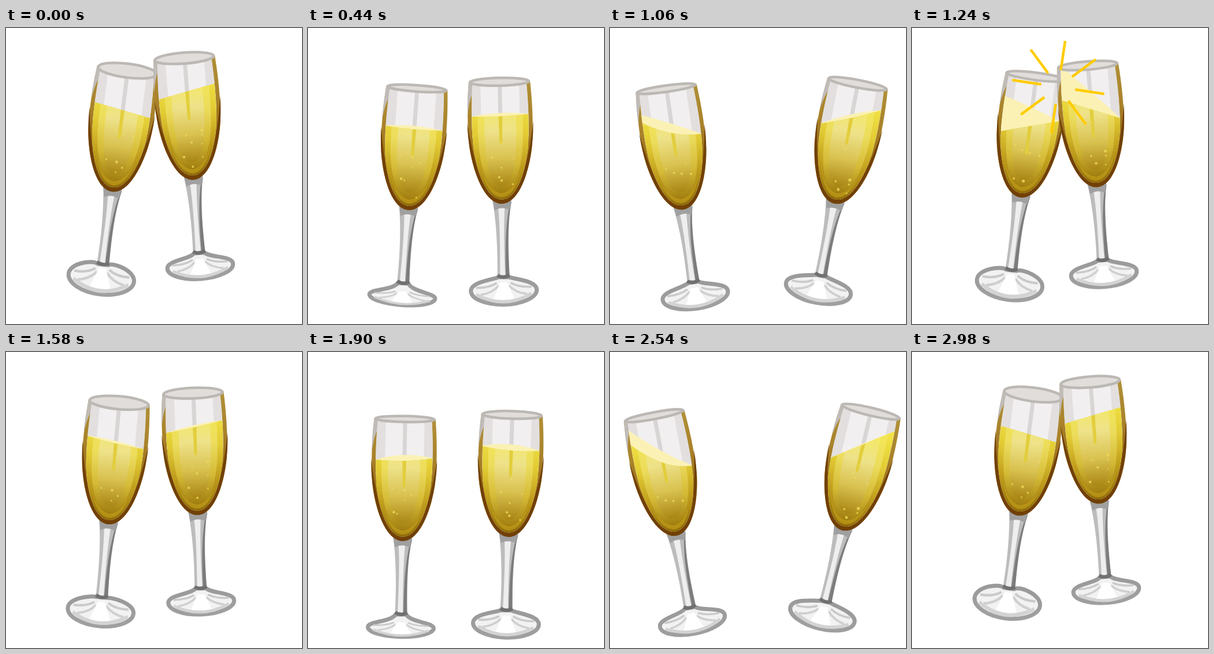
Recreate the animation shown at these times as an HTML page. Size 512x512 px, loop 3 s.

```html
<!DOCTYPE html>
<html lang="en">
<head>
<meta charset="utf-8">
<title>Cheers</title>
<style>
  html, body { margin: 0; width: 100%; height: 100%; overflow: hidden; background: #fff; }
  svg { display: block; width: 100vw; height: 100vh; }
</style>
</head>
<body>
<svg id="stage" viewBox="0 0 512 512"></svg>
<script>
const LOOP = 3000;
const CYCLE = 1500;
const CLINK = 1240;
const TAU = Math.PI * 2;
const stage = document.getElementById('stage');

// Key moments shared by both glasses: time, swing apart, drop, slosh of the liquid
const BEATS = [
  [0, 0, 0, 8], [440, .167, .58, 1], [660, .5, 1, -8], [840, .76, .82, -15],
  [1000, 1, .66, 22], [1240, 0, .18, -15], [1380, 0, 0, 8],
  [1900, .32, .8, -2], [2160, .5, 1, -8], [2500, 1, .66, 22],
  [2540, .945, .6, 28], [2740, 0, .18, -15], [2880, 0, 0, 8], [3000, 0, 0, 8]
];

function bowl(w, top, bottom) {
  const half = s => `C${s * w * .9},-175 ${s * w * .53},${bottom} 0,${bottom}`;
  return `M${-w},${top} C${-w * 1.08},-290 ${-w * 1.07},-250 ${-w * 1.02},-222 ${half(-1)}
    C${w * .53},${bottom} ${w * .9},-175 ${w * 1.02},-222
    C${w * 1.07},-250 ${w * 1.08},-290 ${w},${top}Z`;
}
const OUTER = bowl(53, -337, -125);
const INNER = bowl(46.5, -338, -132);

function gradient(id, y1, y2, ...colors) {
  const stops = colors.map((c, i) => `<stop offset="${i / (colors.length - 1)}" stop-color="${c}"/>`);
  return `<linearGradient id="${id}" gradientUnits="userSpaceOnUse" x1="0" x2="0" y1="${y1}" y2="${y2}">${stops.join('')}</linearGradient>`;
}

function noise(n) {
  const v = Math.sin(n * 91.7 + 13.1) * 4375.5;
  return v - Math.floor(v);
}

const band = (x, w, color) => `<rect x="${x}" y="-340" width="${w}" height="100" fill="${color}"/>`;

function glassMarkup(id) {
  return `<g id="${id}">
    <path class="foot" fill="#f2f2f2" stroke="url(#footEdge)" stroke-width="7"/>
    <g class="shine" fill="none">
      <path d="M-48,31 Q0,60 48,31" stroke="#d3d3d3" stroke-width="6"/>
      <path d="M-12,11 Q-26,20 -48,19 M12,11 Q26,20 48,19" stroke="#cacaca" stroke-width="4"/>
      <path d="M-9,16 Q-20,29 -40,32 M9,16 Q20,29 40,32" stroke="#cfcfcf" stroke-width="4"/>
      <path d="M-6,10 L-18,40 Q0,44 18,40 L6,10Z" fill="#fff"/>
    </g>
    <path d="M-17,-136 C-10,-92 -9,-45 -10.5,0 Q0,6 10.5,0 C9,-45 9,-92 17,-136Z" fill="#bcbcbc"/>
    <path d="M-7,-124 C-4,-85 -5,-45 -6,0 L3,1 C2,-45 2,-85 5,-124Z" fill="#eeeeee"/>
    <path d="M17,-130 C8,-92 9,-45 10.5,0 L4,1 C4,-50 5,-85 13,-122Z" fill="#7c7c7c"/>
    <path d="M-16,-130 H16 L13,-114 Q0,-121 -13,-114Z" fill="#a0a0a0"/>
    <path d="M-10.5,-1 Q0,5 10.5,-1" fill="none" stroke="#707070" stroke-width="6"/>
    <path d="${OUTER}" fill="url(#wall)"/>
    <path d="M-53,-337 Q-57,-300 -56,-280 Q-53,-306 -46,-318 V-337Z" fill="#c0bbb6"/>
    <path d="M-57,-266 C-57,-200 -34,-125 0,-125 C34,-125 57,-200 57,-266 C48,-195 28,-131 0,-131 C-28,-131 -48,-195 -57,-266Z" fill="#714006"/>
    <g clip-path="url(#inner)">
      <path d="${INNER}" fill="#f1eff0"/>
      ${band(-54, 21, '#e2dfde')}${band(-3, 7, '#d8d5d4')}${band(34, 20, '#e2dfde')}
      <path class="surface" fill="#fbf1b4"/>
      <g clip-path="url(#${id}Fill)">
        <path d="${INNER}" fill="url(#amber)"/>
        <path d="${bowl(37, -345, -141)}" fill="url(#gold)"/>
        <path d="${bowl(26, -345, -155)}" fill="url(#glow)"/>
        <path class="streak" fill="#e2ce3c"/>
        <path d="M-36,-190 Q-23,-145 0,-143 Q23,-145 36,-190 Q24,-137 0,-136 Q-24,-137 -36,-190Z" fill="#c9a51c" opacity=".6"/>
        <g class="bubbles" fill="#f3e05c"></g>
      </g>
    </g>
    <ellipse class="rim" cy="-336" rx="51" fill="#e0dddb" stroke="#bcb8b4" stroke-width="4.5"/>
  </g>`;
}

stage.innerHTML = `<defs>
  ${gradient('wall', -337, -125, '#b09038', '#a9822a', '#926410', '#6f3d04')}
  ${gradient('amber', -300, -132, '#f0e245', '#e2cb34', '#bf9c1c', '#8f6a0a')}
  ${gradient('gold', -300, -141, '#f3e757', '#ecdc5c', '#d4ba36', '#9f7b0e')}
  ${gradient('glow', -300, -155, '#f5ea60', '#eee28a', '#d9c250', '#a98514')}
  ${gradient('footEdge', -5, 55, '#999999', '#a0a0a0')}
  <clipPath id="inner"><path d="${INNER}"/></clipPath>
  <clipPath id="leftFill"><path/></clipPath>
  <clipPath id="rightFill"><path/></clipPath>
</defs>
${glassMarkup('left')}${glassMarkup('right')}
<path id="sparks" fill="none" stroke="#ffcc00" stroke-width="4.5"/>`;

// dir: the way the glass swings, -1 left or 1 right
function makeGlass(id, settings) {
  const root = document.getElementById(id);
  const part = name => root.querySelector('.' + name);
  const bubbles = Array.from({ length: 11 }, (_, i) => {
    const dot = document.createElementNS('http://www.w3.org/2000/svg', 'circle');
    const seed = settings.x + i;
    part('bubbles').append(dot);
    return { dot, x: noise(seed) * 60 - 30, phase: noise(seed + 40), r: 1.4 + noise(seed + 80) * 1.5 };
  });
  return {
    ...settings, root, bubbles, foot: part('foot'), shine: part('shine'), surface: part('surface'),
    streak: part('streak'), rim: part('rim'), fill: document.querySelector(`#${id}Fill path`)
  };
}
const glasses = [
  makeGlass('left', {
    dir: -1, x: 168, y: 407, reach: 33, fall: 56, tilt: 7.2, level: -267, slosh: 1,
    footRy: p => 24 + 9 * Math.cos(TAU * (p + .08)), rimRy: p => 8.5 + 3.5 * Math.cos(2 * TAU * p)
  }),
  makeGlass('right', {
    dir: 1, x: 334, y: 387, reach: 43, fall: 72, tilt: -4.4, level: -278, slosh: -1.3,
    footRy: p => 27 - 2 * Math.cos(TAU * p), rimRy: p => 8 + 1.5 * Math.cos(2 * TAU * p)
  })
];
const sparks = document.getElementById('sparks');

// Smooth spline through the beats.
function motionAt(t) {
  const last = BEATS.length - 1;
  let i = 0;
  while (i < last - 1 && t >= BEATS[i + 1][0]) i++;
  const a = BEATS[i], b = BEATS[i + 1];
  const before = BEATS[i - 1] || a, after = BEATS[i + 2] || b;
  const span = b[0] - a[0], u = (t - a[0]) / span, v = 1 - u;
  return [1, 2, 3].map(k => {
    const m1 = (b[k] - before[k]) / (b[0] - before[0]) * span;
    const m2 = (after[k] - a[k]) / (after[0] - a[0]) * span;
    return v * v * (1 + 2 * u) * a[k] + u * u * (3 - 2 * u) * b[k] + u * v * v * m1 - u * u * v * m2;
  });
}

function drawGlass(glass, t) {
  const [swing, drop, wave] = motionAt(t);
  const phase = t / CYCLE % 1;
  const impact = Math.exp(-(((t % CYCLE - CLINK) / 80) ** 2));
  const x = glass.x + glass.dir * (glass.reach * swing * (1 + swing) / 2 - 4 * impact);
  const y = glass.y + glass.fall * drop;
  const tilt = glass.tilt + glass.dir * 18.9 * swing;
  glass.root.setAttribute('transform', `translate(${x} ${y}) rotate(${tilt})`);

  const footRy = glass.footRy(phase), ry = footRy - 3;
  const shoulder = Math.min(16, 72 - 2.4 * footRy), edge = 25 - .65 * ry;
  glass.foot.setAttribute('d', `M-9,2 C-18,${shoulder} -57,${edge} -57,25
    A57,${ry} 0 0 0 57,25 C57,${edge} 18,${shoulder} 9,2Z`);
  glass.shine.setAttribute('transform', `translate(0 ${25 - footRy * .85}) scale(1 ${footRy / 29})`);
  glass.rim.setAttribute('ry', glass.rimRy(phase));

  // The liquid leans with the wave; the far edge swells and splashes on impact.
  const lean = wave * glass.slosh;
  const foam = Math.max(0, lean) * swing;
  const swell = 8 * Math.sin(Math.PI * Math.min(1, Math.max(0, swing)));
  const level = glass.level + 18 * impact;
  const front = [level - lean, level + swell + foam, level + lean];
  const far = [front[0] - 62 * impact - foam, level - 2 * swell - 34 * impact, front[2]];
  glass.fill.setAttribute('d', `M-50,${front[0]} Q0,${front[1]} 50,${front[2]} H70 V-120 H-70 V${front[0]}Z`);
  glass.surface.setAttribute('d', `M-50,${far[0]} Q0,${far[1]} 50,${far[2]}
    V${front[2]} Q0,${front[1]} -50,${front[0]}Z`);
  glass.streak.setAttribute('d', `M-3,${level - 20} H4 L3,${level + 46} Q0,${level + 54} -2,${level + 46}Z`);

  for (const { dot, x: bx, phase: offset, r } of glass.bubbles) {
    const rise = (offset + t / CYCLE) % 1;
    dot.setAttribute('cx', bx * (.65 + .35 * rise));
    dot.setAttribute('cy', -146 - rise * 135);
    dot.setAttribute('r', r * (1 - .3 * rise));
    dot.setAttribute('opacity', .8 - .5 * rise);
  }
}

function drawSparks(t) {
  const p = (t % CYCLE - CLINK + 60) / 160;
  let d = '';
  if (p > 0 && p < 1) {
    const inner = 100 * p ** 1.26, outer = 100 * (1 - (1 - p) ** 3.4);
    for (let i = 0; i < 8; i++) {
      const a = TAU * (i + .19) / 8;
      const at = r => `${253 + r * Math.cos(a)},${102 + r * Math.sin(a)}`;
      d += `M${at(inner)}L${at(outer)}`;
    }
  }
  sparks.setAttribute('d', d);
}

function draw(t) {
  glasses.forEach(glass => drawGlass(glass, t));
  drawSparks(t);
}

const start = performance.now();
function tick() {
  draw((performance.now() - start) % LOOP);
  requestAnimationFrame(tick);
}
draw(0);
requestAnimationFrame(tick);
</script>
</body>
</html>
```
